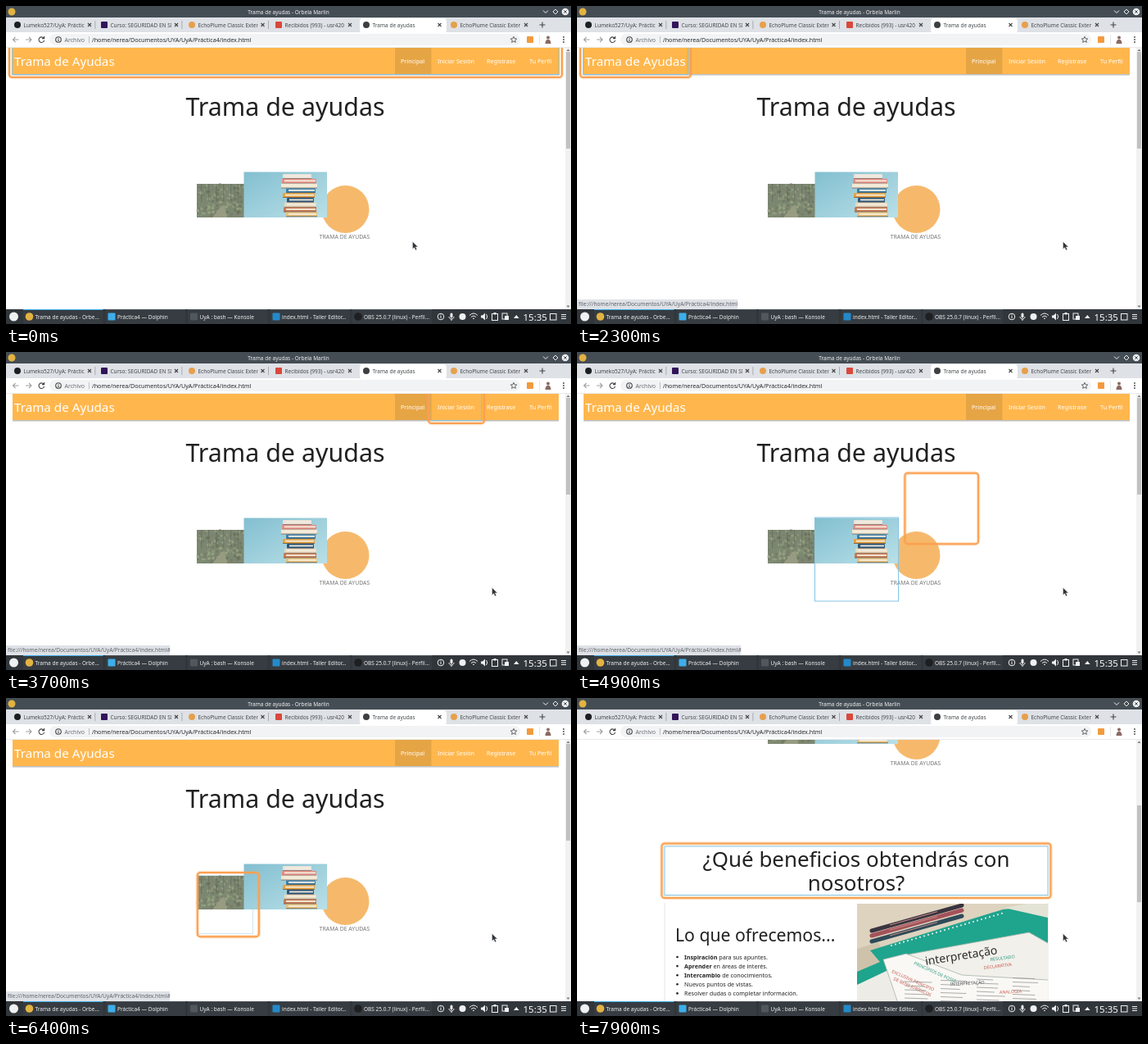
These frames come from a looping animation (690 px wide and 388 px high, 8000 ms). An HTML page:

```html
<!DOCTYPE html>
<html lang="es">
<head>
<meta charset="utf-8">
<style>
html, body { margin: 0; width: 100%; height: 100%; overflow: hidden; background: #fff }
svg { display: block }
text { font: 6.5px "Noto Sans", "Open Sans", sans-serif; white-space: pre }
.mid { text-anchor: middle }
.line { fill: none; stroke: #444; stroke-width: 1.1 }
.tray { fill: none; stroke: #eff0f1; stroke-width: 1 }
</style>
</head>
<body>
<svg id="stage" width="690" height="388" viewBox="0 0 690 388"></svg>
<script>
const LOOP = 8000, SLIDE = 300, SCROLL_AT = 6880, SCROLL = 202;
const PATH = '/home/nerea/Documentos/UYA/UyA/Práctica4/index.html';

// Focus stops in page coordinates: start, x, y, width, height, outline opacity
const stops = [
  [-SLIDE, 8, 50, 667, 33, 1],
  [1900, 8, 50, 127, 33, 1],
  [2600, 475, 50, 45, 33, 1],
  [3300, 520, 50, 60, 33, 1],
  [3800, 580, 50, 52, 33, 1],
  [4250, 632, 50, 43, 33, 1],
  [4774, 291, 202.5, 101, 101, 1],
  [5415, 377, 217, 69, 75, .4],
  [6150, 234, 217, 67, 70, .4],
  [SCROLL_AT, 107.5, 383.5, 467, 58.5, 1]
];

const rect = (x, y, w, h, fill, more = '') =>
  `<rect x="${x}" y="${y}" width="${w}" height="${h}" fill="${fill}" ${more}/>`;
const dot = (x, y, r, fill, more = '') => `<circle cx="${x}" cy="${y}" r="${r}" fill="${fill}" ${more}/>`;
const text = (x, y, s, fill = '#333', size = 6.5, more = '') =>
  `<text x="${x}" y="${y}" fill="${fill}" style="font-size:${size}px" ${more}>${s}</text>`;
const poly = (points, fill) => `<polygon points="${points}" fill="${fill}"/>`;
const path = (d, more = 'class="line"') => `<path d="${d}" ${more}/>`;

let seed = 7;
const rnd = () => (seed = seed * 16807 % 2147483647) / 2147483647;

function forest() {
  const greens = ['#455438', '#7f9560', '#9aa67e', '#5c5a45'];
  let s = rect(233, 217, 67, 41, '#66735a');
  for (let i = 0; i < 160; i++)
    s += dot(234 + rnd() * 56, 218 + rnd() * 38, .6 + rnd() * 1.6, greens[i % 4], 'opacity=".55"');
  for (let x = 238; x < 290; x += 9) s += rect(x, 217, 1.3, 22, '#4a4a38', 'opacity=".5"');
  return `<g opacity=".85">${s}${poly('252,258 263,244 267,244 270,258', '#868a6c')}</g>`;
}

function books() {
  const rows = [
    [338, 35, '#e9e3dc'], [337, 42, '#e58f86'], [336, 44, '#f1e6d2'], [342, 36, '#3f7fa8'],
    [338, 39, '#e9a13c'], [343, 33, '#2c567a'], [340, 39, '#e8dbc0'], [339, 40, '#c77a55'], [342, 38, '#e6c27a']
  ];
  return rect(290.5, 202.5, 101.5, 55.5, 'url(#sky)') + rows.map(([x, w, c], i) => {
    const y = 205 + i * 5.8;
    return rect(x, y, w, 5.6, c, 'rx="1"') + rect(x + 3, y + 1.6, w - 4, 1.8, '#f4ecdd') +
      rect(x, y + 5.1, w, .7, '#5b4a42');
  }).join('');
}

function desk() {
  const pens = [['#3a3440', 284], ['#a4525a', 290], ['#2f4a58', 297]].map(([c, y]) =>
    path(`M360 ${y}L470 ${y - 31}`, `stroke="${c}" stroke-width="5" stroke-linecap="round"`) +
    path(`M382 ${y - 7}L440 ${y - 23.4}`, 'stroke="#c98d86" stroke-width="1"')).join('');
  let coil = '', notes = '';
  for (let x = 384; x < 520; x += 5) coil += dot(x, 302 - (x - 384) * .29, 1.1, '#dcebe4');
  for (let i = 0; i < 24; i++) {
    const x = 400 + (i % 4) * 44, y = 346 + (i / 4 | 0) * 5 - (i % 4) * 1.5;
    notes += path(`M${x} ${y}l${16 + rnd() * 20} 1`, 'stroke="#8c8c8c" stroke-width=".7"');
  }
  const label = (x, y, s, c, turn) =>
    text(x, y, s, c, 5.4, `font-weight="700" transform="rotate(${turn} ${x} ${y})"`);
  return `<g clip-path="url(#photo)">${rect(342, 250, 233, 130, '#ddd3bf')}
    ${poly('342,306 368,298 380,322 342,338', '#cfc2ab')}
    ${poly('358,308 520,258 575,252 575,318 400,335 342,350 342,334 370,322', '#1fa48d')}
    ${poly('522,256 556,250 575,250 575,268', '#e3e3d6')}
    ${coil}${pens}
    ${poly('404,313 552,286 575,299 575,372 430,372', '#f1f0ea')}
    ${poly('342,350 380,332 404,372 342,372', '#eeece6')}
    ${poly('374,319 402,312 470,338 575,344 575,372 392,372', '#f9f8f4')}
    ${path('M404 313L552 286L575 299M392 372L374 319L402 312L470 338L575 344', 'fill="none" stroke="#a9b3ac" stroke-width=".8"')}
    ${text(426, 326, 'interpretação', '#2c2c2c', 14, 'font-style="italic" transform="rotate(-9 426 326)"')}
    ${label(505, 321, 'RESULTADO', '#2b9582', -7)}${label(497, 331, 'DECLARATIVA', '#c95a4f', -7)}
    ${label(384, 335, 'EXCLUSIVA PRINCIPIO', '#c95a4f', 24)}${label(386, 344, 'DE BENS JURÍDICOS', '#c95a4f', 24)}
    ${label(411, 325, 'PRINCÍPIOS DE POSSE', '#2b9582', 24)}
    ${label(456, 351, 'INTERPRETAÇÃO', '#444', -3)}${label(516, 361, 'ANALOGIA', '#c95a4f', -3)}
    ${notes}</g>`;
}

function page() {
  const items = [[482, 'Principal'], [527, 'Iniciar Sesión'], [587, 'Registrase'], [639, 'Tu Perfil']];
  const list = ['<tspan font-weight="600">Inspiración</tspan> para sus apuntes.',
    '<tspan font-weight="600">Aprender</tspan> en áreas de interés.',
    '<tspan font-weight="600">Intercambio</tspan> de conocimientos.',
    'Nuevos puntos de vistas.', 'Resolver dudas o completar información.'];
  return `${rect(8, 51, 667, 33.6, '#777', 'opacity=".45"')}${rect(8, 50, 667, 33, '#ffb74d')}
    ${rect(475, 50, 44.5, 33, '#e6a545')}
    ${text(10, 72.5, 'Trama de Ayudas', '#fff', 15.2)}
    ${items.map(([x, s]) => text(x, 70, s, '#fff', 7.2)).join('')}
    ${text(341, 133.5, 'Trama de ayudas', '#212121', 30.4, 'class="mid"')}
    ${forest()}
    ${dot(414.5, 248, 29, '#f6b96c')}
    ${text(413.5, 284, 'TRAMA DE AYUDAS', '#777', 6.9, 'class="mid"')}
    <rect id="outline" fill="none" stroke="#82c4e6"/>
    ${books()}
    <g transform="translate(0 ${SCROLL})">
    ${text(341, 206, '¿Qué beneficios obtendrás con', '#212121', 25.9, 'class="mid"')}
    ${text(341, 235, 'nosotros?', '#212121', 25.9, 'class="mid"')}
    ${rect(106.5, 250, 469, 140, '#e4e4e4')}${rect(107.5, 250, 467, 140, '#fff')}
    ${text(120, 297, 'Lo que ofrecemos...', '#212121', 21.2)}
    ${list.map((s, i) => dot(122.5, 316 + i * 11.1, 1.3, '#222') + text(131, 318.6 + i * 11.1, s, '#222', 7.2)).join('')}
    ${desk()}</g>
    <rect id="glow" rx="4" fill="none" stroke="#ffa24c" stroke-width="4.5" opacity=".3"/>
    <rect id="ring" rx="3.5" fill="none" stroke="#faa052" stroke-width="2"/>`;
}

function browser() {
  const tabs = [[14, 'Lumeko527/UyA: Práctica', '#1b1f23'], [120, 'Curso: SEGURIDAD EN SI', '#32145a'],
    [227, 'EchoPlume Classic Exter', '#e6a04c'], [333, 'Recibidos (993) - usr420', '#d9483b'],
    [440, 'Trama de ayudas', '#3c4043'], [547, 'EchoPlume Classic Exter', '#e6a04c']];
  const ends = [102, 208, 313.5, 420, 529.5, 635];
  return rect(0, 0, 690, 14, '#454d54') + dot(7, 7, 4.5, '#e3b341') +
    text(345, 9.6, 'Trama de ayudas - Orbela Marlin', '#eff0f1', 6.5, 'class="mid"') +
    path('M656 5.5l3 3 3-3M668 7l3-3 3 3-3 3z', 'fill="none" stroke="#eff0f1"') +
    dot(683, 7, 4.3, '#eff0f1') + path('M681.3 5.3l3.4 3.4m0-3.4l-3.4 3.4', 'stroke="#454d54"') +
    rect(0, 14, 690, 18, '#dee1e6') + rect(432, 15, 106, 18, '#fff', 'rx="4"') +
    tabs.map(([x, s, c], i) => (i == 1 || i == 3 ? rect(x - 4, 19, 8, 8, c, 'rx="1"') : dot(x, 23, 4, c)) +
      text(x + 7.5, 25.5, s, '#45494d') +
      rect(ends[i] - 6, 17, 12, 13, i == 4 ? '#fff' : '#dee1e6') +
      path(`M${ends[i] - 2} 21l4 4m0-4l-4 4`) + (i < 3 ? rect(ends[i] + 6.5, 18, .8, 10, '#9a9da1') : '')).join('') +
    path('M655 19.5v7m-3.5-3.5h7') +
    rect(0, 32, 690, 19, '#fff') + rect(53, 34, 575, 14, '#f1f3f4', 'rx="7"') + rect(0, 50.4, 690, .6, '#ddd') +
    path('M15.5 41h-7m3-3l-3 3 3 3M24 41h7m-3-3l3 3-3 3', 'class="line" opacity=".5"') +
    path('M46 39.2a3.3 3.3 0 1 0 .6 2.6M46.6 37v2.6h-2.6') +
    dot(64, 41, 3.3, 'none', 'class="line"') + path('M64 40.5v2.4m0-4v.8') +
    text(71.5, 43.5, 'Archivo', '#6b6f74', 7) + rect(101, 37, .7, 8, '#aaa') + text(105, 43.5, PATH, '#26292c', 7.2) +
    path('M620 37.3l1.1 2.5 2.7.2-2.1 1.8.7 2.6-2.4-1.4-2.4 1.4.7-2.6-2.1-1.8 2.7-.2z', 'class="line" style="stroke-width:.8"') +
    rect(636, 37, 8, 8, '#f29b3d', 'rx="1"') + rect(651, 35, .7, 12, '#ddd') +
    dot(662, 38.5, 2, '#8a6a62') + path('M658.5 46c0-7 7-7 7 0z', 'fill="#8a6a62"') +
    [38, 41, 44].map(y => dot(681, y, .9, '#444')).join('');
}

function taskbar() {
  const tasks = [[21, 'Trama de ayudas - Orbe...', '#e3b341'], [121.5, 'Práctica4 — Dolphin', '#3daee9'],
    [222, 'UyA : bash — Konsole', '#50575d'], [322.5, 'index.html - Taller Editor...', '#2489ca'],
    [422.5, 'OBS 25.0.7 (linux) - Perfil...', '#1d1f21']];
  const gear = '#eff0f1';
  return rect(0, 370, 690, 18, '#31363b') + dot(9.5, 379, 5.5, gear) +
    tasks.map(([x, s, c], i) => rect(x, 370, 97.5, 18, '#363c41') +
      rect(x, 370, 97.5, 1, i ? '#4d545a' : '#3daee9') +
      (i % 4 ? rect(x + 3, 374.5, 9, 9, c, 'rx="1"') : dot(x + 7.5, 379, 4.8, c)) +
      text(x + 14.5, 381.5, s, gear)).join('') +
    dot(531, 379, 3.8, 'none', 'class="tray"') + path('M531 378v3m0-4.6v1', 'class="tray"') +
    rect(542.5, 374.5, 3, 6, gear, 'rx="1.5"') + path('M541 379c0 4 6 4 6 0m-3 3v2', 'class="tray"') +
    dot(557.5, 379, 4, gear) +
    path('M566 377.5q5-5 10 0m-8 2q3-3 6 0m-4 2q1-1 2 0', 'class="tray"') +
    path('M580 377.5h2l3-3v9l-3-3h-2z', `fill="${gear}"`) + path('M586.5 376q2.5 3 0 6', 'class="tray"') +
    rect(593.5, 375.5, 7, 8, 'none', 'class="tray"') + rect(595.5, 374, 3, 2.5, gear) +
    rect(606, 375, 6, 7, 'none', 'class="tray"') + rect(609, 378, 5, 5, gear) +
    path('M620 381l3.3-4 3.3 4z', `fill="${gear}"`) +
    text(631.5, 383.5, '15:35', '#fcfcfc', 11.5) +
    rect(664.5, 375.5, 7.5, 7.5, 'none', 'class="tray"') + path('M678 376.5h6m-6 2.5h6m-6 2.5h6', 'class="tray"');
}

const $ = id => document.getElementById(id);
$('stage').innerHTML = `<defs>
  <linearGradient id="sky" x2="1" y2="1"><stop stop-color="#83bfd0"/><stop offset="1" stop-color="#b9e0e8"/></linearGradient>
  <clipPath id="photo">${rect(342, 251, 233, 140, '#fff')}</clipPath></defs>
  ${rect(0, 0, 690, 388, '#fff')}<g id="page">${page()}</g>
  ${rect(683, 51, 7, 319, '#f1f1f1')}${rect(684, 0, 5, 118, '#c1c1c1', 'id="thumb"')}
  ${path('M684.5 55l2-2.5 2 2.5z', 'fill="#777"')}${path('M684.5 365.5l2 2.5 2-2.5z', 'fill="#777"')}
  <g id="status">${rect(0, 358, 197, 12, '#dee1e6', 'id="statusBox"')}${text(2, 366.3, '', '#5f6368', 6.6, 'id="url"')}</g>
  ${browser()}${taskbar()}
  <path id="cursor" d="M0 0v9l2.1-1.8 1.5 3.2 1.7-.8-1.5-3.1h2.9z" fill="#31363b" stroke="#ddd" stroke-width=".6"/>`;

const set = (el, attrs) => { for (const k in attrs) el.setAttribute(k, attrs[k]); };
const box = ([x, y, width, height], grow) =>
  ({ x: x - grow, y: y - grow, width: width + 2 * grow, height: height + 2 * grow });
const clamp = p => Math.min(1, Math.max(0, p));

function draw(t) {
  const i = stops.findLastIndex(s => t >= s[0]);
  const to = stops[i], from = stops[Math.max(0, i - 1)];
  const k = 1 - (1 - clamp((t - to[0]) / SLIDE)) ** 2;
  const now = to.slice(1, 5).map((v, j) => from[j + 1] + (v - from[j + 1]) * k);
  set($('ring'), box(now, 4));
  set($('glow'), box(now, 4));
  set($('outline'), { ...box(to.slice(1, 5), .5), opacity: to[5] });

  const down = t >= SCROLL_AT;
  set($('page'), { transform: `translate(0 ${down ? -SCROLL : 0})` });
  set($('thumb'), { y: down ? 131 : 56 });

  const hash = t >= 3300;
  $('url').textContent = 'file://' + PATH + (hash ? '#' : '');
  set($('statusBox'), { width: hash ? 200 : 196 });
  set($('status'), { visibility: t >= 1900 && t < 7300 ? 'visible' : 'hidden' });

  const m = clamp((t - 800) / 500);
  set($('cursor'), { transform: `translate(${496.5 + 97 * m * m * (3 - 2 * m)} 287.5)` });
}

const start = performance.now();
function tick() {
  draw((performance.now() - start) % LOOP);
  requestAnimationFrame(tick);
}
tick();
</script>
</body>
</html>
```
